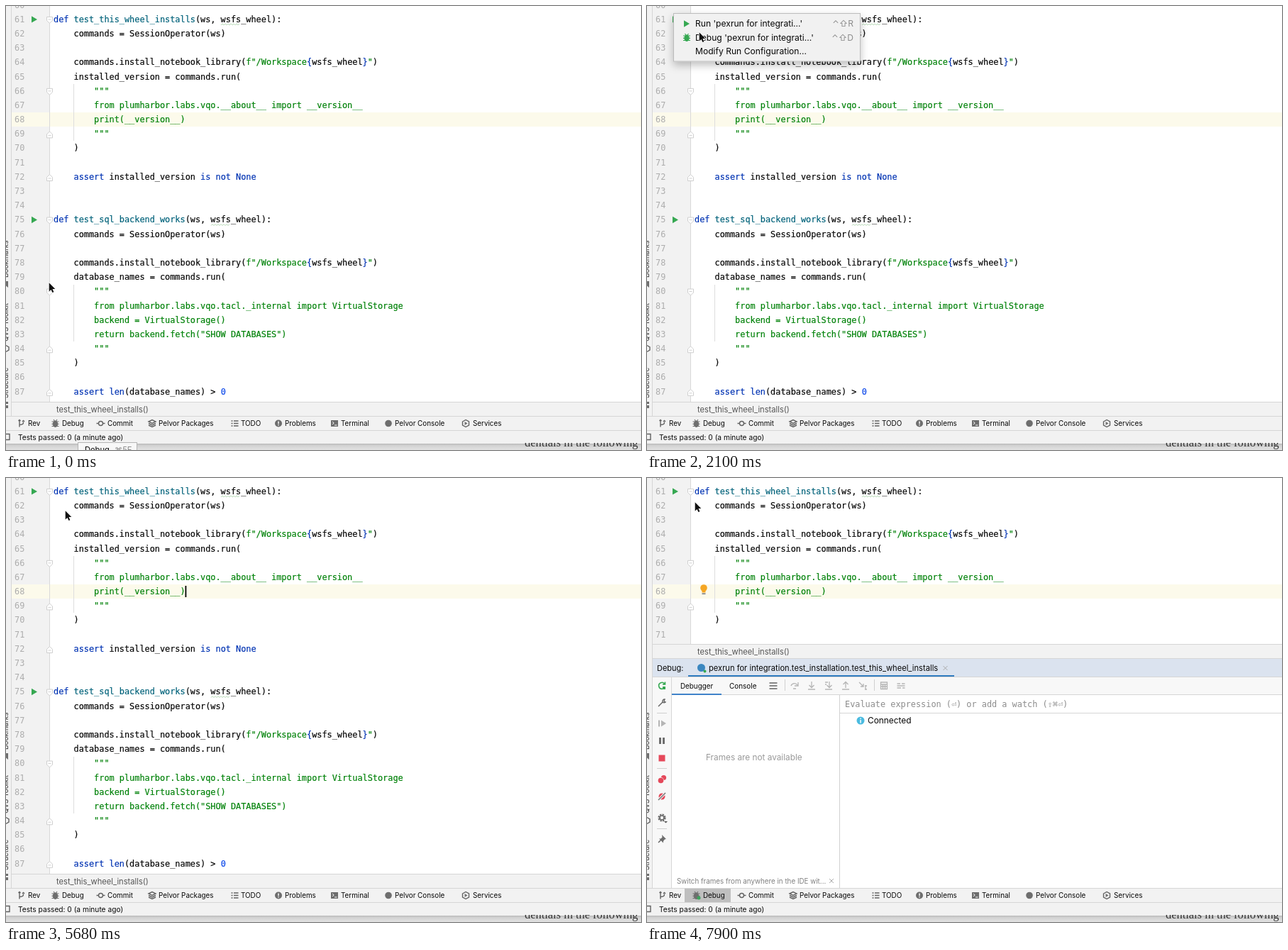
Animation of 895 by 626 pixels, one loop 8 s. Source, as an HTML page:

```html
<!DOCTYPE html>
<html lang="en">
<head>
<meta charset="utf-8">
<title>Debugging a test</title>
<style>
html, body { margin: 0; width: 100%; height: 100%; overflow: hidden; background: #fff; }
#stage { position: relative; width: 895px; height: 626px; overflow: hidden; background: #fff; }
.gutter { position: absolute; left: 0; top: 0; width: 61px; height: 558px; background: #f2f2f2; }
.current { position: absolute; left: 8px; top: 150px; width: 887px; height: 20px; background: #fcfaeb; }
pre { position: absolute; top: -11.4px; margin: 0; font: 11.87px/20.19px "DejaVu Sans Mono", monospace; color: #080808; }
#numbers { left: 12px; color: #adadad; }
#code { left: 67px; }
#code, .mono { -webkit-text-stroke: .2px; }
pre b { font-weight: 400; color: #0033b3; }
pre i { font-style: normal; color: #00627a; }
pre s { text-decoration: none; color: #008209; }
pre u { text-decoration: none; color: #1750eb; }
svg { position: absolute; left: 0; top: 0; font-family: Inter, "DejaVu Sans", sans-serif; }
svg text { white-space: pre; }
.mono { font: 11.87px "DejaVu Sans Mono", monospace; stroke: currentColor; stroke-width: 0; }
.ic { fill: none; stroke: #626262; stroke-width: 1.4; }
.off { fill: none; stroke: #b5b5b5; stroke-width: 1.3; }
.rerun { fill: none; stroke: #36a852; stroke-width: 1.6; }

.tip, .menu, .pick, .caret, .panel, .bulb, .out1, .out2, .out3, .console, .debugger, .hover {
  animation: 8s step-end infinite;
}
.tip { animation-name: tip; }
.menu { animation-name: menu; }
.pick { animation-name: pick; }
.caret { animation-name: caret; }
.panel { animation-name: panel; }
.bulb, .out1 { animation-name: first; }
.out2 { animation-name: second; }
.out3 { animation-name: third; }
.console { animation-name: console; }
.debugger { animation-name: debugger; }
.hover { animation-name: hover; }
@keyframes tip { 0% { opacity: 1 } 3.75%, 100% { opacity: 0 } }
@keyframes menu { 0% { opacity: 0 } 16.875% { opacity: 1 } 71%, 100% { opacity: 0 } }
@keyframes pick { 0% { opacity: 0 } 28.125% { opacity: 1 } 71%, 100% { opacity: 0 } }
@keyframes caret { 0% { opacity: 0 } 71% { opacity: 1 } 89.5%, 100% { opacity: 0 } }
@keyframes panel { 0% { opacity: 0 } 74.75%, 100% { opacity: 1 } }
@keyframes first { 0% { opacity: 0 } 78.375%, 100% { opacity: 1 } }
@keyframes second { 0% { opacity: 0 } 82.125%, 100% { opacity: 1 } }
@keyframes third { 0% { opacity: 0 } 85.75%, 100% { opacity: 1 } }
@keyframes console { 0% { opacity: 1 } 89.5%, 100% { opacity: 0 } }
@keyframes debugger { 0% { opacity: 0 } 89.5%, 100% { opacity: 1 } }
@keyframes hover { 0% { opacity: 0 } 87.625% { opacity: 1 } 93.25%, 100% { opacity: 0 } }

.pointer { animation: pointer 8s linear infinite; }
@keyframes pointer {
  0% { transform: translate(60px, 389px) }
  1.875% { transform: translate(60px, 389px); animation-timing-function: steps(5, jump-both) }
  11.25% { transform: translate(36px, 15px) }
  20.625% { transform: translate(36px, 15px); animation-timing-function: steps(3, jump-both) }
  26.25% { transform: translate(73px, 36px) }
  28.125% { transform: translate(73px, 36px); animation-timing-function: steps(2, jump-both) }
  31.875% { transform: translate(84px, 45px) }
  33.75% { transform: translate(84px, 45px); animation-timing-function: steps(3, jump-both) }
  39.25% { transform: translate(64px, 45px) }
  41.125% { transform: translate(64px, 45px); animation-timing-function: steps(2, jump-both) }
  44.75% { transform: translate(83px, 45px) }
  78.375% { transform: translate(83px, 45px); animation-timing-function: steps(5, jump-both) }
  87.625% { transform: translate(60px, 289px) }
  93.25% { transform: translate(60px, 289px); animation-timing-function: steps(3, jump-both) }
  98.75%, 100% { transform: translate(67px, 33px) }
}
</style>
</head>
<body>
<div id="stage">
<div class="gutter"></div>
<div class="current"></div>
<pre id="numbers"></pre>
<pre id="code">

<b>def</b> <i>test_this_wheel_installs</i>(ws, wsfs_wheel):
    commands = SessionOperator(ws)

    commands.install_notebook_library(<s>f"/Workspace</s><b>{</b>wsfs_wheel<b>}</b><s>"</s>)
    installed_version = commands.run(
<s>        """
        from plumharbor.labs.vqo.__about__ import __version__
        print(__version__)
        """</s>
    )

    <b>assert</b> installed_version <b>is not None</b>


<b>def</b> <i>test_sql_backend_works</i>(ws, wsfs_wheel):
    commands = SessionOperator(ws)

    commands.install_notebook_library(<s>f"/Workspace</s><b>{</b>wsfs_wheel<b>}</b><s>"</s>)
    database_names = commands.run(
<s>        """
        from plumharbor.labs.vqo.tacl._internal import VirtualStorage
        backend = VirtualStorage()
        return backend.fetch("SHOW DATABASES")
        """</s>
    )

    <b>assert</b> <b>len</b>(database_names) > <u>0</u>
</pre>
<svg id="ui" width="895" height="626" viewBox="0 0 895 626"></svg>
</div>
<script>
const rowY = n => 18.9 + 20.19 * (n - 61);
const rect = (x, y, w, h, fill, extra = '') => `<rect x="${x}" y="${y}" width="${w}" height="${h}" fill="${fill}" ${extra}/>`;
const text = (x, y, size, s, fill = '#080808', extra = '') => `<text x="${x}" y="${y}" font-size="${size}" fill="${fill}" ${extra}>${s}</text>`;
const mono = (x, y, s, fill) => `<text class="mono" x="${x}" y="${y}" fill="${fill}">${s}</text>`;
const path = (d, attrs) => `<path d="${d}" ${attrs}/>`;
const icon = (x, y, d, cls = 'ic') => path(d, `class="${cls}" transform="translate(${x},${y})"`);
const dot = (x, y, r, fill) => `<circle cx="${x}" cy="${y}" r="${r}" fill="${fill}"/>`;
const group = (cls, ...parts) => `<g class="${cls}">${parts.join('')}</g>`;
const play = (x, y) => path(`M${x} ${y - 4.7}l8 4.7-8 4.7z`, 'fill="#36a852"');

const bug = (x, y, color) =>
  `<g transform="translate(${x},${y})" stroke="${color}" stroke-width="1.2" fill="none">
    <path d="M-5-2.5H5M-5 .8H5M-5 4H5M-2.5-5.5L-1-3.5M2.5-5.5L1-3.5"/>
    <ellipse cy=".8" rx="3" ry="4.2" fill="${color}"/></g>`;

const fold = (n, end) =>
  `<g transform="translate(61.5,${rowY(n) + 1}) scale(1,${end ? -1 : 1})" fill="#fff" stroke="#cfcfcf">
    <path d="M-4-4.5h8v5l-4 4-4-4z"/><path d="M-2-1h4"/></g>`;

const squiggle = (n, x) => {
  let d = `M${x} ${rowY(n) + 8}`;
  for (let i = 0; i < 13; i++) d += `l2 ${i % 2 ? 2 : -2}`;
  return path(d, 'fill="none" stroke="#b4d8b4"');
};

const breadcrumb = y =>
  rect(8, y, 887, 21, '#f2f2f2') + rect(8, y, 887, 1, '#d6d6d6') +
  text(71, y + 14.5, 11.15, 'test_this_wheel_installs()', '#555');

const sideLabel = (y, s) => text(0, 0, 9.9, s, '#333', `transform="translate(2.5,${y}) rotate(-90)"`);

const editor = [
  rect(61, 0, 1, 558, '#d9d9d9'),
  squiggle(61, 303), squiggle(75, 289),
  ...[61, 75].map(n => play(36, rowY(n))),
  ...[61, 66, 75, 80].map(n => fold(n)),
  ...[69, 72, 84, 87].map(n => fold(n, true)),
  rect(95, 110, 1, 80, '#dedede'), rect(95, 393, 1, 80, '#dedede'),
  rect(0, 0, 7, 600, '#f2f2f2'), rect(7, 0, 1, 579, '#d6d6d6'),
  sideLabel(383, 'Bookmarks'), sideLabel(473, 'QVS Toolkit'), sideLabel(553, 'Structure'),
  path('M0 388h3v9l-3-2.5z', 'fill="#6e6e6e"'),
  icon(0, 483, 'M0-4.5L4-2V2L0 4.5'),
  rect(0, 558, 3, 3, '#6e6e6e'), rect(0, 563, 3, 4, '#6e6e6e'),
  breadcrumb(558),
].join('');

const tools = [
  [31, 'Rev'], [79, 'Debug'], [143, 'Commit'], [215, 'Pelvor Packages'], [331, 'TODO'],
  [393, 'Problems'], [472, 'Terminal'], [548, 'Pelvor Console'], [658, 'Services'],
];
const bottom = [
  rect(0, 579, 895, 38, '#f2f2f2'), rect(0, 578, 895, 1, '#d6d6d6'), rect(0, 598, 895, 1, '#d6d6d6'),
  group('panel', rect(53, 579, 65, 19, '#bfbfbf')),
  icon(21.5, 588.5, 'M-2.5-5V5M-2.5 2C3 2 3 0 3-2M-4-3.5l1.5-1.5 1.5 1.5M1.5-2.5L3-4l1.5 1.5'),
  bug(69.5, 588.5, '#6e6e6e'), group('panel', dot(73, 592, 2.5, '#3ba55c')),
  icon(133.5, 588.5, 'M-6 0h3M3 0h3M-3 0a3 3 0 1 0 6 0a3 3 0 1 0-6 0'),
  icon(206, 588.5, 'M-5-2.5L0-5 5-2.5 0 0zM-5 0L0 2.5 5 0M-5 2.5L0 5 5 2.5'),
  icon(322.5, 588.5, 'M-5-3.5h2M-1.5-3.5h6.5M-5 0h2M-1.5 0h6.5M-5 3.5h2M-1.5 3.5h6.5'),
  dot(384, 588.5, 5, '#6e6e6e'), rect(383.3, 585.5, 1.4, 3.8, '#fff'), rect(383.3, 590.2, 1.4, 1.4, '#fff'),
  rect(458, 584, 10, 9, '#6e6e6e'), path('M460 586l2.2 2-2.2 2M463 591h3.5', 'stroke="#fff" fill="none"'),
  dot(539, 588.5, 4.8, '#6e6e6e'),
  icon(648, 588.5, 'M-4.5-2.5L0-5 4.5-2.5V2.5L0 5-4.5 2.5z'), path('M646.5 586l4 2.5-4 2.5z', 'fill="#6e6e6e"'),
  ...tools.map(([x, s]) => text(x, 592, 9.85, s)),
  icon(1, 607.5, 'M-4-4H4V4H-4'), text(17, 611.5, 10.2, 'Tests passed: 0 (a minute ago)'),
  rect(0, 617, 895, 9, 'url(#shade)'),
  `<g clip-path="url(#below)">${text(731, 620.5, 16.4, 'dentials in the following', '#333', 'font-family="Liberation Serif, serif"')}</g>`,
  group('tip', rect(101.5, 615.5, 83, 20, '#f7f7f7', 'stroke="#b5b5b5"'), text(111, 630, 11.2, 'Debug'), text(153, 630, 11.2, '⌘5E', '#888')),
].join('');

const rail = [
  icon(21, 293, 'M4-2.5A4.5 4.5 0 1 0 1 4.3M4.5-5.5V-2H1', 'rerun'),
  rect(22, 294, 4, 4, '#36a852'),
  icon(21, 317, 'M-5 5L1-1M1-1A3 3 0 0 1 4-5L3-2 5-1A3 3 0 0 1 1-1'),
  rect(14, 331, 14, 1, '#d0d0d0'),
  rect(16, 341.5, 2, 9, '#b5b5b5'), path('M20 341.5l7 4.5-7 4.5z', 'fill="#b5b5b5"'),
  rect(17, 366, 3, 9, '#6e6e6e'), rect(22, 366, 3, 9, '#6e6e6e'),
  rect(16.5, 390.5, 9, 9, '#e5485a'),
  rect(14, 409, 14, 1, '#d0d0d0'),
  dot(23.5, 422.5, 3.6, '#e5485a'), dot(19.5, 426.5, 4.4, '#f2f2f2'), dot(19.5, 426.5, 3.8, '#e5485a'),
  dot(21, 449, 4.5, '#e5485a'), path('M15.5 454.5l11-11', 'stroke="#f2f2f2" stroke-width="3.5"'),
  path('M16 454l10-10', 'stroke="#6e6e6e" stroke-width="1.3"'),
  `<circle cx="21" cy="479" r="4.4" fill="none" stroke="#6e6e6e" stroke-width="2.4" stroke-dasharray="2.3 1.15"/>
   <circle cx="21" cy="479" r="2.9" class="ic"/>`,
  path('M24 484h5l-2.5 2.5z', 'fill="#555"'),
  rect(14, 494, 14, 1, '#d0d0d0'),
  path('M21 503l6 6-2 .5-2 2.5v2.5l-6-6h2.5l2-2z', 'fill="#6e6e6e"'), path('M16 514l4-4', 'class="ic"'),
].join('');

const toolbar = [
  icon(178, 293, 'M-5.5-4H5.5M-5.5 0H5.5M-5.5 4H5.5'),
  rect(194, 284, 1, 16, '#d0d0d0'),
  icon(208, 293, 'M-5 0A5 5 0 0 1 4-1M5-5V0H0M-2 4H2', 'off'),
  icon(232, 293, 'M0-6V2M-3.5-1L0 2.5 3.5-1M-5 5H5', 'off'),
  icon(256, 293, 'M1-6V2M-2.5-1L1 2.5 4.5-1M-5 5H5M-5-5H-1M-5-2H-3', 'off'),
  icon(280, 293, 'M0 3V-5M-3.5-2L0-5.5 3.5-2M-5 5H5', 'off'),
  icon(304, 293, 'M-5-5L1 1M1-3V1H-3M4-1V5M3 0h3M3 5h3', 'off'),
  rect(320, 284, 1, 16, '#d0d0d0'),
  icon(334, 293, 'M-4.5-5H4.5V4.5H-4.5zM-4.5-2H4.5M-4.5 1H4.5M-1.5-2V4M1.5-2V4', 'off'),
  icon(358, 293, 'M-5.5-3H-1M1-3H5.5M-5.5 0H5.5M-5.5 3H0M2 3H5.5', 'off'),
].join('');

const home = '"/Users/pavel.dorinko/Library/Application Support/shelf/env/virtual/vq-transfer-workshop/KR37mdqy/vq-transfer-workshop/bin';
const consoleView = group('console',
  rect(35, 306, 26, 272, '#f2f2f2'), rect(61, 306, 1, 272, '#d6d6d6'),
  rect(38, 309, 19, 20, '#d2d2d2', 'rx="2"'), dot(47.5, 319, 5.5, '#3b87c0'),
  icon(47.5, 343.5, 'M-5.5 0a5.5 5.5 0 1 0 11 0a5.5 5.5 0 1 0-11 0M0-3.5V0H3', 'off'),
  rect(105, 304, 61, 2, '#8fb0d8'),
  group('out1', mono(62, 320.5, home, '#000a90')),
  group('out2', mono(62, 340.7, 'Connected to stepo debugger (build 221.6008.13)', '#000a90')),
  group('out3', mono(62, 360.9, 'Launching pexrun with arguments integration/test_installation.py::test_this_wheel_installs --no-header --no-summary -q', '#080808')));

const debuggerView = group('debugger',
  rect(35, 304, 70, 2, '#4083c9'),
  rect(271, 306, 1, 272, '#d0d0d0'), rect(272, 331, 623, 1, '#d6d6d6'),
  mono(279, 323, 'Evaluate expression (⏎) or add a watch (⇧⌘⏎)', '#8c8c8c'),
  dot(301, 342, 5.5, '#4bbbe0'), rect(300.3, 341, 1.5, 4.5, '#fff'), rect(300.3, 338.5, 1.5, 1.5, '#fff'),
  text(311, 346, 11.9, 'Connected'),
  text(83, 397.5, 11.8, 'Frames are not available', '#999'),
  text(42, 572, 9.8, 'Switch frames from anywhere in the IDE wit...', '#808080'),
  path('M257 565l6 6M263 565l-6 6', 'stroke="#aaa"'));

const panel = group('panel',
  rect(8, 234, 887, 344, '#fff'), breadcrumb(234),
  rect(8, 255, 887, 25, '#ededed'),
  group('debugger', rect(8, 255, 887, 25, '#dbe3ef')),
  rect(8, 254, 887, 1, '#d6d6d6'),
  rect(8, 280, 887, 26, '#f2f2f2'), rect(8, 280, 26, 298, '#f2f2f2'),
  group('debugger', rect(8, 280, 887, 26, '#f8f8f8'), rect(8, 280, 26, 298, '#f8f8f8')),
  rect(8, 280, 887, 1, '#d6d6d6'), rect(34, 280, 1, 298, '#d6d6d6'), rect(35, 305, 860, 1, '#d6d6d6'),
  rect(58, 278, 375, 2, '#a0a9b5'), group('debugger', rect(58, 278, 375, 2, '#2f7bbf')),
  text(14, 272, 11, 'Debug:'), dot(76.5, 267.5, 5.5, '#3b87c0'), dot(81.5, 272.5, 2, '#36a852'),
  text(87, 272, 11.15, 'pexrun for integration.test_installation.test_this_wheel_installs'),
  path('M417.5 265l6 6M423.5 265l-6 6', 'stroke="#aaa"'),
  group('hover', rect(35, 281, 70, 24, '#cfcfcf')),
  rail, toolbar, consoleView, debuggerView,
  text(47, 296.5, 9.85, 'Debugger'), text(116, 296.5, 9.95, 'Console'));

const bulb = group('bulb', dot(80, 155, 4.8, '#f5a623'), rect(77.5, 158, 5, 3.5, '#f5a623'), rect(77.5, 162.5, 5, 1.5, '#777'));

const menuItem = (y, label, keys, color, keyColor) =>
  text(68, y, 12.1, label, color) + (keys ? text(291, y, 12.1, keys, keyColor, 'text-anchor="end"') : '');
const debugLabel = "Debug 'pexrun for integrati...'";
const menu = group('menu',
  rect(37.5, 10.5, 263, 67.5, '#f1f1f1', 'stroke="#bcbcbc" filter="url(#soft)"'),
  play(52, 25), bug(56, 44.5, '#36a852'),
  menuItem(29, "Run 'pexrun for integrati...'", '⌃⇧R', '#080808', '#8c8c8c'),
  menuItem(48.5, debugLabel, '⌃⇧D', '#080808', '#8c8c8c'),
  menuItem(68, 'Modify Run Configuration...', '', '#080808'),
  group('pick', rect(38, 35, 262, 19, '#0860c6'), bug(56, 44.5, '#36a852'),
    menuItem(48.5, debugLabel, '⌃⇧D', '#fff', '#fff')));

const defs = `<defs>
  <linearGradient id="shade" x2="0" y2="1"><stop stop-color="#b9b9b9"/><stop offset=".3" stop-color="#d2d2d2"/><stop offset="1" stop-color="#e2e2e2"/></linearGradient>
  <clipPath id="below"><rect x="700" y="616" width="195" height="10"/></clipPath>
  <filter id="soft" x="-20%" y="-40%" width="140%" height="200%"><feDropShadow dx="0" dy="5" stdDeviation="6" flood-opacity=".25"/></filter>
</defs>`;

const arrow = path('M.7 1.2V13.4L3.5 10.9 5.4 15.1 7.4 14.2 5.5 10.1H9.3Z',
  'fill="#111" stroke="#fff" stroke-width="1.2" paint-order="stroke"');

document.getElementById('numbers').textContent = Array.from({ length: 28 }, (_, i) => 60 + i).join('\n');
document.getElementById('ui').innerHTML =
  defs + editor + group('caret', rect(252.5, 152, 1.8, 16, '#000')) + bulb + panel + bottom + menu + group('pointer', arrow);
</script>
</body>
</html>
```
